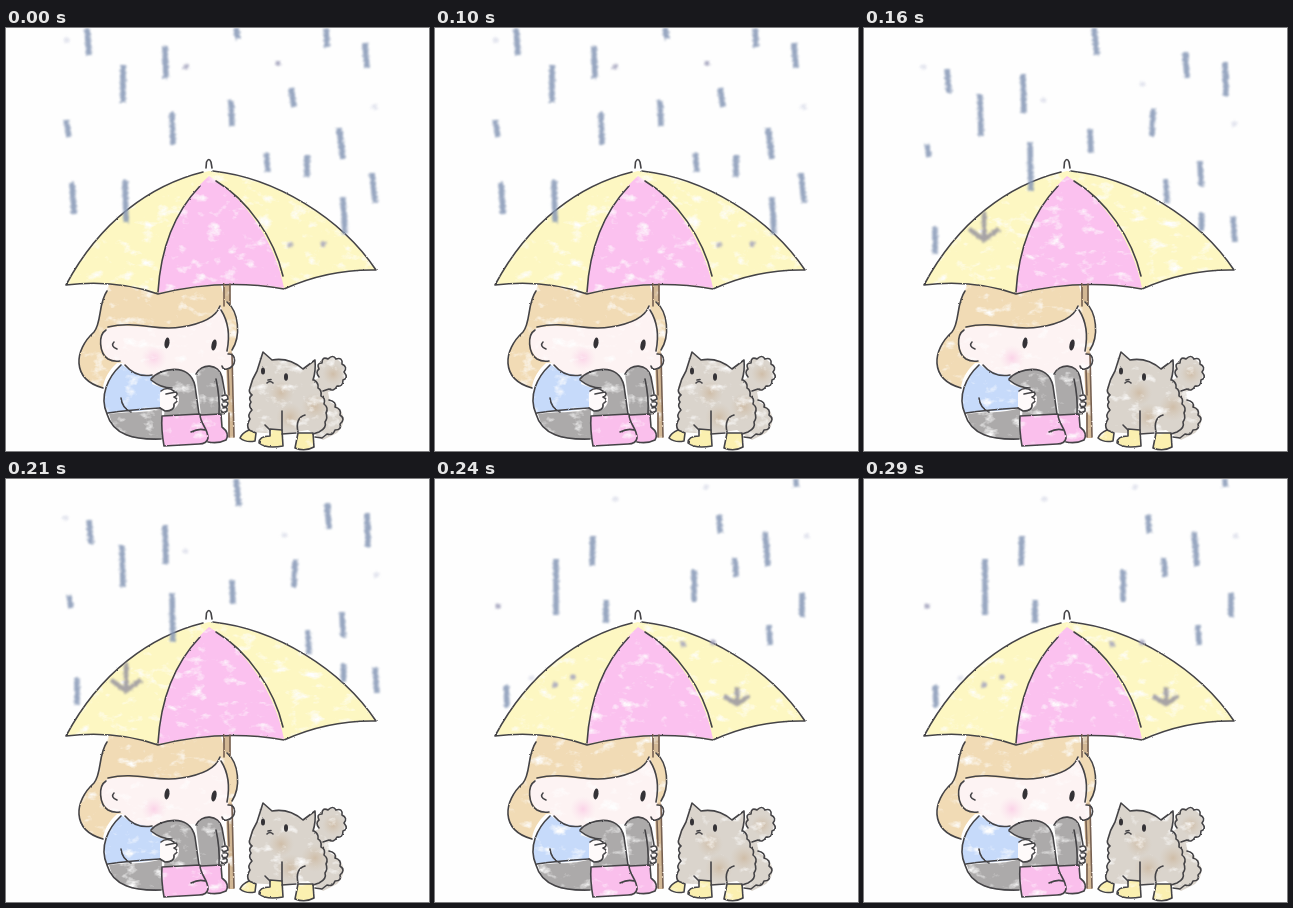
Animation of 423x423 px, one loop 320 ms. Source, as an HTML page:

```html
<!DOCTYPE html>
<html lang="en">
<head>
<meta charset="utf-8">
<title>Sheltering from the rain</title>
<style>
html, body { margin: 0; width: 100%; height: 100%; overflow: hidden; background: #fefefe; }
svg { display: block; width: 100vw; height: 100vh; }
.pose { opacity: 0; animation: 320ms step-end infinite; }
.one { animation-name: one; }
.two { animation-name: two; }
.three { animation-name: three; }
@keyframes one { 0% { opacity: 1 } 50%, 100% { opacity: 0 } }
@keyframes two { 0% { opacity: 0 } 50% { opacity: 1 } 75%, 100% { opacity: 0 } }
@keyframes three { 0% { opacity: 0 } 75%, 100% { opacity: 1 } }
.ink { fill: none; stroke: #444346; stroke-width: 1.6; stroke-linecap: round; stroke-linejoin: round; }
.rain { fill: none; stroke: #8798b6; stroke-width: 5.5; opacity: .86; mix-blend-mode: multiply; }
.dots { stroke: #a3a3bd; stroke-width: 5.5; stroke-linecap: round; }
.faint { stroke: #dfe1ec; stroke-width: 5; stroke-linecap: round; }
.splash { stroke: #98959f; stroke-width: 4.5; }
</style>
</head>
<body>
<svg viewBox="0 0 423 423" preserveAspectRatio="none">
<defs>
  <g id="paint">
    <path fill="#d2b794" d="M217 254H224L228 410H223Z"/>
    <!-- girl -->
    <path fill="#f1dbb5" d="M101 262C92 276 96 294 88 304C68 322 65 351 97 360C98 350 104 341 111 335L216 326L226 323C236 306 232 282 219 272L214 254H104Z"/>
    <path fill="#fdf3f3" d="M102 300C93 304 93 320 101 329C106 333 111 333 116 334C126 351 145 350 160 345H208C216 342 219 339 222 341C230 336 229 326 222 326C225 306 220 290 214 277C210 289 196 296 175 299C151 304 131 294 102 300Z"/>
    <circle cx="148" cy="330" r="13" fill="url(#blush)"/>
    <path fill="#c6dafa" d="M115 336C102 349 94 368 101 385C119 382 137 385 156 379L162 362L146 356L148 348C137 347 124 344 115 336Z"/>
    <path fill="#acaaaa" d="M103 386C120 383 139 386 156 380V411C126 413 108 407 103 386Z"/>
    <path fill="#acaaaa" d="M145 351C154 341 183 334 189 357L193 387L158 388L161 360C154 360 149 357 145 351Z"/>
    <path fill="#acaaaa" d="M190 346C195 335 213 335 216 349L219 387H195Z"/>
    <path fill="#fefafa" d="M154 365C158 359 164 358 169 362L173 369C174 379 167 383 159 383L154 379Z"/>
    <path fill="#fabfec" d="M156 388L194 386C194 396 202 400 202 410Q201 416 193 416L158 418Q155 401 156 388Z"/>
    <path fill="#fabfec" d="M195 387L215 386L216 399Q224 405 220 412Q212 416 202 414C202 402 194 399 195 387Z"/>
    <path fill="#fefafa" d="M216 368Q224 366 222 374Q224 380 217 384Q212 376 216 368Z"/>
    <!-- umbrella -->
    <path fill="#fdf7c2" d="M203 143C145 156 94 193 60 257Q109 251 152 266Q216 250 278 261Q322 241 370 242C335 190 270 150 203 143Z"/>
    <path fill="#fbc1ef" d="M203 148C174 174 155 213 152 265Q216 250 278 260C270 216 240 170 203 148Z"/>
    <!-- cat -->
    <path fill="#dad4cc" d="M313 335C319 326 332 329 337 337C343 350 334 360 322 364L324 374C337 380 343 393 331 405L317 412L302 402L277 406L242 404C242 388 248 378 243 361C245 352 248 348 251 343L257 324L266 332C279 329 288 335 297 341L309 332L308 352L313 350C310 345 309 340 313 335Z"/>
    <g fill="url(#fur)">
      <circle cx="309" cy="379" r="14"/>
      <circle cx="284" cy="389" r="14"/>
      <circle cx="327" cy="346" r="11"/>
      <circle cx="275" cy="365" r="13"/>
    </g>
    <path fill="#fbf0b0" d="M243 402L250 405L249 413Q240 415 234 410Q236 405 243 402ZM264 401L276 402L277 418Q260 421 253 415Q253 408 264 408ZM292 405L307 405L308 419Q299 424 289 420Z"/>
  </g>

  <radialGradient id="blush">
    <stop offset="0" stop-color="#fbd3e8"/>
    <stop offset="1" stop-color="#fbe3ec" stop-opacity="0"/>
  </radialGradient>
  <radialGradient id="fur">
    <stop offset="0" stop-color="#cdb89f" stop-opacity=".8"/>
    <stop offset="1" stop-color="#d4c6b4" stop-opacity="0"/>
  </radialGradient>
</defs>

<g id="scenes"></g>

<g class="ink" filter="url(#pencil)">
  <!-- umbrella -->
  <path d="M200 140L200.500 134Q203 129 205 134L206 140M197 144C145 157 94 193 60 257Q109 251 152 266Q216 250 278 261Q322 241 370 242C335 190 270 150 207 143"/>
  <path d="M194 158C171 182 155 214 152 264M210 153C242 172 268 210 277 248"/>
  <path stroke="#755f50" d="M218 256V278M224 256V276M222 342L223 367M226 326L228 409M223 385V409"/>
  <!-- girl -->
  <path d="M101 263C92 276 96 294 88 304C68 322 65 351 97 360M102 299C131 292 151 304 175 299C196 296 210 289 214 278M221 274C233 284 235 308 226 322M215 282C222 293 224 308 221 323"/>
  <path d="M100 302C92 307 93 325 102 331Q107 334 114 333M108 314Q104 318 111 321M119 337Q130 350 146 347M222 326C231 325 231 339 221 341Q217 342 216 338"/>
  <path d="M115 337C102 349 93 368 101 386C107 407 128 412 155 411M102 385Q122 382 154 380M125 384Q116 380 115 370"/>
  <path d="M145 351C154 340 184 334 189 358L193 386M145 352Q155 360 166 360M190 346C195 335 213 335 216 349L219 366M210 351Q214 369 213 386"/>
  <path d="M155 363Q161 358 168 363M160 366L170 364Q173 367 168 369M168 369Q174 372 169 375M168 376Q169 383 159 383L154 380"/>
  <path d="M156 388L194 386C194 396 202 400 202 410Q201 416 193 416L158 418Q155 401 156 388M195 387L215 386L216 399Q224 405 220 412Q212 416 202 414M185 404Q193 400 199 402"/>
  <path d="M216 368Q222 365 222 371Q217 374 216 371M217 374Q224 373 221 378Q216 380 216 376M217 380Q222 378 221 383Q217 386 215 383"/>
  <!-- cat -->
  <path d="M244 360Q246 351 251 343L257 324L266 332Q283 329 297 341L309 332Q310 343 307 352M244 360Q242 364 246 367Q242 370 245 374Q242 378 246 382Q241 387 244 391Q240 397 243 402M308 352Q313 355 312 360Q316 362 315 368Q320 370 318 376Q323 380 320 385Q322 390 319 394Q321 400 313 404L307 406"/>
  <path d="M313 349Q309 344 313 341Q310 335 316 335Q316 328 322 331Q327 326 330 331Q337 329 336 336Q342 339 338 344Q343 350 337 352Q337 359 331 358Q328 364 323 361L317 363"/>
  <path d="M323 372Q331 374 329 379Q336 381 334 387Q340 391 334 396Q336 402 329 402Q327 408 321 406L316 410L309 409M276 383L276 402M292 404Q289 390 299 387M259 397L264 402M276 406L290 405"/>
  <path d="M243 402L250 405L249 413Q240 415 234 410Q236 405 243 402M264 401L276 402L277 418Q260 421 253 415Q253 408 264 408ZM292 405L307 405L308 419Q299 424 289 420Z"/>
  <path d="M262 352L265 351.500M261 355Q264 352 267 355"/>
  <g fill="#343236" stroke="none">
    <ellipse cx="161" cy="315" rx="2.500" ry="5.500" transform="rotate(8 161 315)"/>
    <ellipse cx="208" cy="317" rx="2.500" ry="5.500" transform="rotate(12 208 317)"/>
    <ellipse cx="257" cy="343" rx="2" ry="3.500"/>
    <ellipse cx="280" cy="349" rx="2" ry="3.700"/>
  </g>
</g>

<g class="pose one"><g class="rain" filter="url(#rough)">
  <path d="M81 1L83 27M117 37V74M159 18L160 51M230 0L232 11M320 0L321 19M359 15L361 40M285 60L288 79M225 72L226 98M166 84L167 117M60 92L63 109M260 125L262 144M301 127V149M333 100L337 131M366 145L369 175M66 154L68 186M119 152L120 195M337 169L339 206"/>
  <path class="dots" d="M180 39h.1M272 35h.1M284 217h.1M317 216h.1"/>
  <path class="faint" d="M60 12h1M368 79h1"/>
</g></g>
<g class="pose two"><g class="rain" filter="url(#rough)">
  <path d="M230 0L233 27M83 41L85 65M159 46L160 85M116 66L117 108M321 24L323 50M361 34L362 68M289 81L288 108M226 101L227 125M63 116L65 129M166 114L167 163M336 133L337 158M302 151L303 175M337 185L338 203M369 189L371 214M71 199V226"/>
  <path class="splash" d="M120 184L120 212M105 201L120 212L135 201"/>
  <path class="faint" d="M59 39h1M179 72h1M278 56h1M370 96h1"/>
</g></g>
<g class="pose three"><g class="rain" filter="url(#rough)">
  <path d="M361 0V8M284 36L285 54M158 57L157 87M330 53L333 87M300 79L301 98M121 80V136M259 91V123M171 121V144M367 114V138M334 146L335 166M71 206L72 228"/>
  <path class="splash" d="M302 208V224M289 217L302 225L314 217"/>
  <path class="dots" d="M63 127h.1M248 165h.1M278 163h.1M120 206h.1M138 198h.1"/>
  <path class="faint" d="M270 8h1M180 20h1M371 57h1M96 199h1"/>
</g></g>

<defs id="filters">
  <filter id="pencil" filterUnits="userSpaceOnUse" x="0" y="0" width="423" height="423" color-interpolation-filters="sRGB">
    <feTurbulence type="fractalNoise" baseFrequency=".3" numOctaves="2" seed="8"/>
    <feDisplacementMap in="SourceGraphic" scale="1.800" xChannelSelector="R" yChannelSelector="G"/>
    <feGaussianBlur stdDeviation=".35"/>
  </filter>
  <filter id="rough" filterUnits="userSpaceOnUse" x="0" y="0" width="423" height="423" color-interpolation-filters="sRGB">
    <feTurbulence type="fractalNoise" baseFrequency=".5" numOctaves="2" seed="5"/>
    <feDisplacementMap in="SourceGraphic" scale="4" xChannelSelector="R" yChannelSelector="G"/>
    <feGaussianBlur stdDeviation=".9"/>
  </filter>
</defs>
</svg>
<script>
// Each pose gets its own crayon grain.
const crayon = (name, seed) => `
  <filter id="crayon-${name}" filterUnits="userSpaceOnUse" x="0" y="0" width="423" height="423" color-interpolation-filters="sRGB">
    <feTurbulence type="fractalNoise" baseFrequency=".06 .09" numOctaves="4" seed="${seed}"/>
    <feColorMatrix values="0 0 0 0 0  0 0 0 0 0  0 0 0 0 0  -3.5 0 0 0 3.05" result="grain"/>
    <feComposite in="SourceGraphic" in2="grain" operator="in"/>
    <feGaussianBlur stdDeviation=".5"/>
  </filter>`;

const scene = name =>
  `<g class="pose ${name}"><use href="#paint" filter="url(#crayon-${name})"/></g>`;

const poses = ["one", "two", "three"];
document.getElementById("filters").innerHTML += poses.map((name, i) => crayon(name, 3 + i * 8)).join("");
document.getElementById("scenes").innerHTML = poses.map(scene).join("");
</script>
</body>
</html>
```
